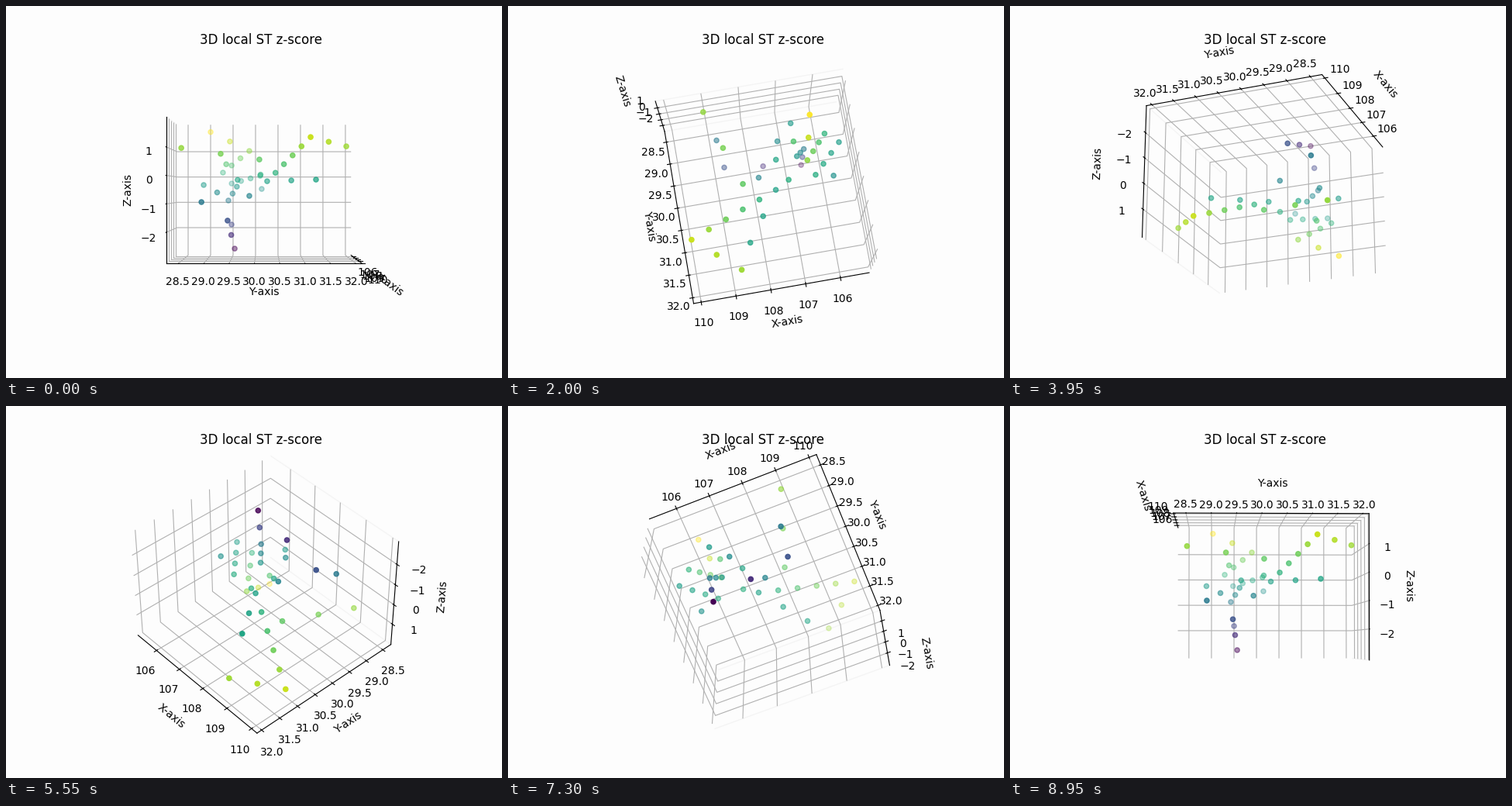
A matplotlib script that plays this animation: 640 px wide and 480 px high, repeating every 9000 ms.

```python
import numpy as np
import matplotlib.pyplot as plt
from matplotlib.animation import FuncAnimation

FRAMES, INTERVAL, STEP = 180, 50, 2
PAPER = "#fdfdfd"

# Axis limits: x (longitude), y (latitude), z (score)
LIMITS = np.array([[105.173, 110.217], [28.254, 32.126], [-3.09, 2.065]])
# Edge lengths of the box the corners are measured in
BOX = np.array([1.1905, 1.1905, 0.8929])


def ring(*corners):
    """Closed path of (x, y, z, n): each leg is cut into n equal steps."""
    keys = np.array(corners)
    ends = np.roll(keys, -1, axis=0)
    return [a[:3] + (b - a)[:3] * k / a[3]
            for a, b in zip(keys, ends) for k in range(int(a[3]))]


east = ring((.245, .518, .275, 1), (.16, .33, .066, 2),
            (-.06, .02, .057, 5), (.52, .285, .324, 2))
outer = ring((-.517, -.22, .044, 3), (-.327, -.026, .095, 1),
             (-.446, -.016, .007, 2), (.144, -.03, .194, 2),
             (.314, -.518, .263, 1), (.26, -.394, -.076, 2))
upper = ring((-.34, -.357, .387, 2), (-.282, -.098, .259, 3),
             (-.43, -.277, .117, 1), (-.232, -.399, .033, 1))
lower = ring((-.222, -.25, .17, 2), (.032, -.095, -.038, 1),
             (.24, -.23, -.193, 2), (-.274, -.195, -.389, 2),
             (-.292, -.237, -.07, 2), (-.234, -.18, .022, 1))

points = np.array(east + outer + upper + lower)
low, high = LIMITS.T
x, y, z = ((low + high) / 2 + points / BOX * (high - low)).T

fig = plt.figure(figsize=(6.4, 4.8), dpi=100, facecolor=PAPER)
ax = fig.add_subplot(projection="3d", facecolor=PAPER)
ax.scatter(x, y, z, c=z, cmap="viridis")
ax.set_title("3D local ST z-score", x=0.5027)
ax.set(xlabel="X-axis", ylabel="Y-axis", zlabel="Z-axis",
       xlim=LIMITS[0], ylim=LIMITS[1], zlim=LIMITS[2],
       xticks=range(106, 111), yticks=np.arange(28.5, 32.1, 0.5),
       zticks=range(-2, 2))

for axis, edge in ((ax.xaxis, "none"), (ax.yaxis, "0.925"), (ax.zaxis, "none")):
    axis.pane.set_fill(False)
    axis.pane.set_edgecolor(edge)


def update(i):
    angle = STEP * i
    ax.view_init(elev=angle, azim=angle)
    return []


anim = FuncAnimation(fig, update, frames=FRAMES, interval=INTERVAL,
                     repeat=True, repeat_delay=0, blit=False)
plt.show()
```
